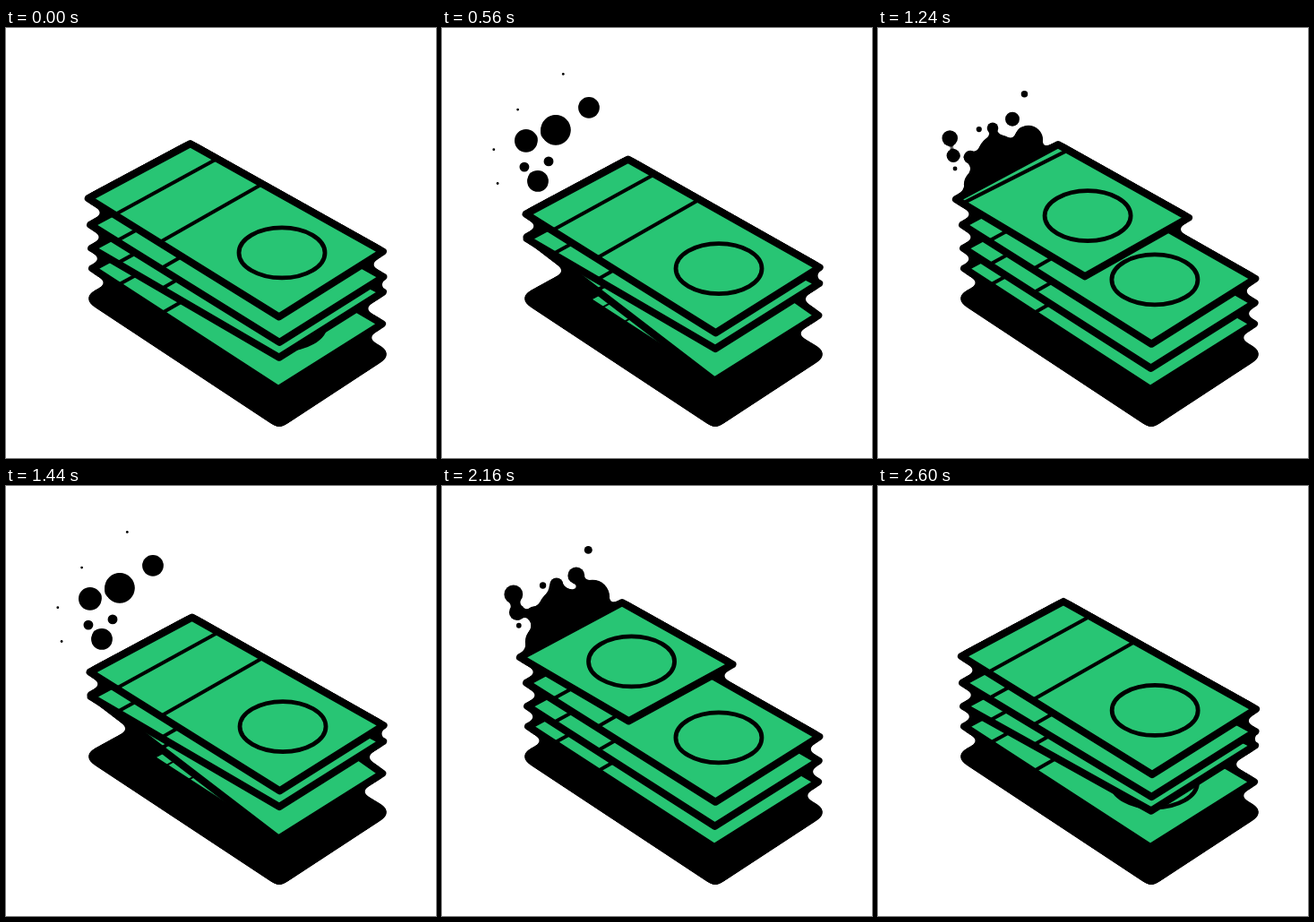
An HTML page that plays this animation: 480x480 px, repeating every 2640 ms.

```html
<!DOCTYPE html>
<html lang="en">
<head>
<meta charset="utf-8">
<title>Cash stack</title>
<style>
  html, body { margin: 0; width: 100%; height: 100%; overflow: hidden; background: #fff; }
  svg { display: block; width: 100vw; height: 100vh; }
  .bill { fill: #28c574; }
  .line { fill: none; stroke: #000; }
  .edge { stroke-width: 8.2; stroke-linejoin: round; }
</style>
</head>
<body>
<svg viewBox="0 0 480 480">
  <defs>
    <filter id="goo" filterUnits="userSpaceOnUse" x="0" y="0" width="480" height="480">
      <feGaussianBlur stdDeviation="4"/>
      <feColorMatrix values="0 0 0 0 0  0 0 0 0 0  0 0 0 0 0  0 0 0 16 -7.4"/>
    </filter>
  </defs>
  <g filter="url(#goo)">
    <polygon points="99,302 212,240 418,364 305,438" stroke="#000" stroke-width="16" stroke-linejoin="round"/>
    <g id="backs"></g>
    <use href="#drops"/>
  </g>
  <g id="drops"></g>
  <g id="bills"></g>
</svg>
<script>
const PERIOD = 880;
const OUT = 400, BREAK = 560; // splash fully out, splash broken into drops
const CORNERS = [[93, 190], [207, 129], [422, 249], [306, 322]]; // left, top, right, bottom
const FOLDS = [0.138, 0.372];

const $ = id => document.getElementById(id);
const lerp = (a, b, k) => a + (b - a) * k;
const mix = (p, q, k) => [lerp(p[0], q[0], k), lerp(p[1], q[1], k)];
const clamp = v => Math.min(1, Math.max(0, v));
const smooth = (t, from, span) => {
  const k = clamp((t - from) / span);
  return k * k * (3 - 2 * k);
};
const bump = (t, mid, reach) =>
  Math.abs(t - mid) < reach ? Math.cos((t - mid) / reach * Math.PI / 2) ** 2 : 0;

function make(tag, parent, attrs = {}) {
  const el = document.createElementNS('http://www.w3.org/2000/svg', tag);
  set(el, attrs);
  return parent.appendChild(el);
}
function set(el, attrs) {
  for (const k in attrs) el.setAttribute(k, attrs[k]);
}

// Bills, from the one growing on the floor (0) to the one sliding away (4)
const bills = [0, 1, 2, 3, 4].map(i => {
  const g = make('g', $('bills'));
  const clip = make('clipPath', g, { id: 'clip' + i });
  const shapes = [
    make('polygon', $('backs'), { class: 'edge', stroke: '#000' }),
    make('polygon', clip),
    make('polygon', g, { class: 'bill' })
  ];
  const art = make('g', g, { class: 'line', 'clip-path': `url(#clip${i})` });
  const folds = FOLDS.map(() => make('line', art, { 'stroke-width': 4 }));
  const seal = make('ellipse', art, { rx: 48, ry: 28, 'stroke-width': 4.8 });
  shapes.push(make('polygon', g, { class: 'line edge' }));
  return { g, shapes, folds, seal };
});

// Depth of a place in the stack, 0 being the top
const depth = slot => 31.5 * slot - 1.8 * slot * slot;

// The lower bills are flung up as they rise: first the left end, then the right
const kick = (i, t) => ({
  1: [26 * bump(t, 560, 140), 20 * bump(t, 790, 210)],
  2: [0, 20 * bump(t, 680, 250)]
}[i] || [0, 0]);

function ends(i, t) {
  const moving = i > 0 && i < 4;
  const low = moving ? 4 - i : i ? 0 : 3;
  const k = moving ? smooth(t, 465, 220) : 0;
  const now = kick(i, t), last = kick(i - 1, t + PERIOD);
  return [0, 1].map(e =>
    lerp(depth(low) + e * low, depth(low - 1) + e * (low - 1), k) - now[e] - last[e]);
}

function drawBill(bill, i, t, slide) {
  const [left, right] = ends(i, t);
  const drop = Math.min(slide, 4.8);
  const rest = CORNERS.map(([x, y], c) =>
    c < 2 ? [x + left * 0.04, y + left] : [x - right * 0.025, y + right]);
  const raw = rest.map(([x, y], c) =>
    [x - slide, y + drop - slide * (c % 3 ? 0.56 : 0.66)]);
  // The left end stops at the splash while the rest slides into it
  const stop = Math.min(slide, 6);
  const outline = raw.map((p, c) => c < 2 ? [rest[c][0] - stop, rest[c][1] + stop * 0.2] : p);
  const points = outline.map(p => p.join()).join(' ');
  bill.shapes.forEach(s => set(s, { points }));

  const across = u => [mix(raw[1], raw[2], u), mix(raw[0], raw[3], u)];
  bill.folds.forEach((el, n) => {
    const [a, b] = across(FOLDS[n]);
    set(el, { x1: a[0], y1: a[1], x2: b[0], y2: b[1] });
  });
  const [cx, cy] = mix(...across(0.733), 0.48);
  set(bill.seal, { cx, cy });
}

function show(bill, on, transform = '') {
  for (const el of [bill.g, bill.shapes[0]]) {
    set(el, { transform, display: on ? 'inline' : 'none' });
  }
}

// Lobes of the splash: out at x, y, then a round drop of radius r at x, y
const lobes = [
  [168, 124, 164, 89, 12],
  [134, 141, 127, 114, 17],
  [121, 154, 94, 126, 13],
  [112, 174, 107, 171, 12],
  [103, 143, 92, 155, 5.5],
  [116, 162, 119, 149, 5.5]
].map(([x, y, x1, y1, r]) => ({ from: [x, y, r * 1.6], to: [x1, y1, r] }));

const fly = (x, y, r, r1) => ({ from: [x, y, r], to: [x - 28, y - 20, r1] });
const knobs = [[150, 100, 9.5], [128, 110, 7.5], [80, 121, 10.5], [84, 141, 9]]
  .map(p => fly(...p, 0));

// Specks fan out over the short edge of the top bill
const specks = [0, 1, 2, 3].map(i => {
  const a = 0.05 + i * Math.PI / 6;
  const along = 129 * Math.sin(a), off = 70 * Math.cos(a);
  return fly(202 - 0.88 * along - 0.47 * off, 130 + 0.47 * along - 0.88 * off, 4.5 - 0.8 * i, 1.4);
});

const drops = [...lobes, ...knobs, ...specks].map(d => ({ ...d, el: make('circle', $('drops')) }));

function drawDrop({ el, from, to }, t) {
  const p = clamp((t - 160) / (OUT - 160));
  const k = Math.max(0, (t - OUT) / (BREAK - OUT));
  const f = clamp((202 - from[0]) / 114);
  const start = [202 - 114 * f, 136 + 61 * f];
  const [x, y] = k ? mix(from, to, k) : mix(start, from, p * (2 - p));
  const r = lerp(from[2], to[2], Math.min(k, 1)) * p * clamp(1 - (t - BREAK) / 100);
  set(el, { cx: x, cy: y, r });
}

function draw(t) {
  const slide = 97 * ((t + 160) / 560) ** 3.55;
  bills.forEach((bill, i) => drawBill(bill, i, t, i === 4 ? Math.min(slide, 213) : 0));
  show(bills[4], slide < 207);

  const s = smooth(t, 450, 220), rest = 1 - s;
  show(bills[0], s > 0.01, `translate(${234 * rest} ${338 * rest}) scale(${s})`);

  drops.forEach(d => drawDrop(d, t));
}

const start = performance.now();
function tick() {
  draw((performance.now() - start) % PERIOD);
  requestAnimationFrame(tick);
}
tick();
</script>
</body>
</html>
```
